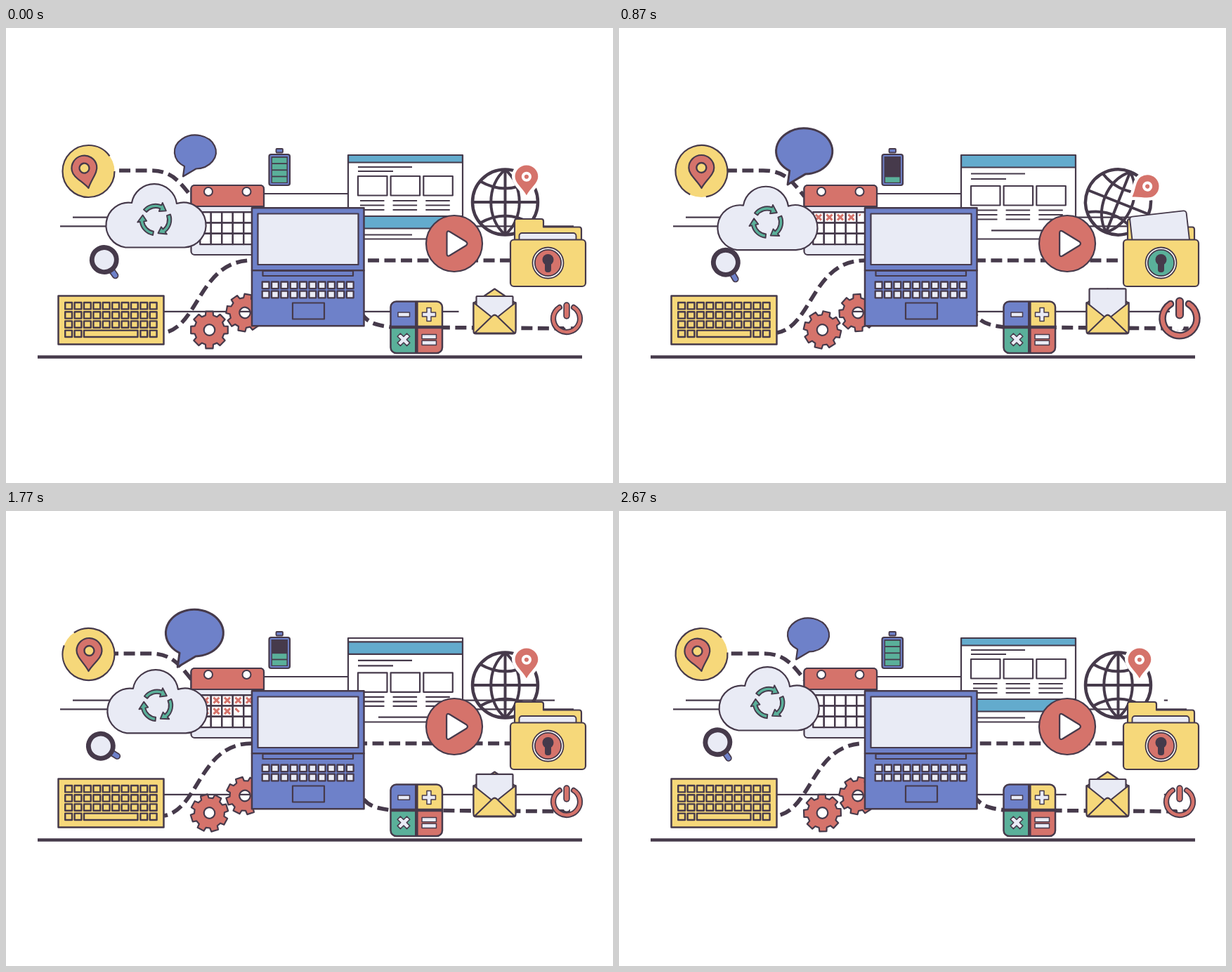
These frames come from a looping animation (864 by 648 pixels, 2.7 s). An HTML page with a canvas:

```html
<!DOCTYPE html>
<html lang="en">
<head>
<meta charset="utf-8">
<title>Connected devices</title>
<style>
html, body { margin: 0; width: 100%; height: 100%; overflow: hidden; background: #fff; }
canvas { display: block; }
</style>
</head>
<body>
<canvas id="stage" width="864" height="648"></canvas>
<script>
const ctx = document.getElementById('stage').getContext('2d');
const LOOP = 2700, TAU = Math.PI * 2, DEG = Math.PI / 180;
const dark = '#463a4b', yellow = '#f6d87a', red = '#d5736b', blue = '#6e81c9',
      green = '#5ab09a', light = '#e9ebf5', cyan = '#63abcd', white = '#fff';

// --- drawing helpers ---
function paint(path, fill, width = 2.2, stroke = dark) {
  if (fill) { ctx.fillStyle = fill; ctx.fill(path, 'evenodd'); }
  if (width) { ctx.lineWidth = width; ctx.strokeStyle = stroke; ctx.stroke(path); }
}
const shape = (d, ...style) => paint(new Path2D(d), ...style);
function box(x, y, w, h, r, ...style) {
  const p = new Path2D();
  p.roundRect(x, y, w, h, r);
  paint(p, ...style);
}
function disc(x, y, r, ...style) {
  const p = new Path2D();
  p.arc(x, y, r, 0, TAU);
  paint(p, ...style);
}
const line = (x1, y, x2, width = 2.2) => x2 > x1 && shape(`M${x1} ${y}H${x2}`, null, width);
function at(x, y, angle, scale, draw) {
  ctx.save();
  ctx.translate(x, y);
  ctx.rotate(angle * DEG);
  ctx.scale(scale, scale);
  draw();
  ctx.restore();
}
function tube(d, outer, inner, fill) {
  ctx.lineCap = 'round';
  shape(d, null, outer);
  shape(d, null, inner, fill);
  ctx.lineCap = 'butt';
}

// --- timing helpers ---
const clamp = v => Math.min(1, Math.max(0, v));
const ease = (t, a, b) => (1 - Math.cos(Math.PI * clamp((t - a) / (b - a)))) / 2;
const bump = (t, a, b) => Math.sin(Math.PI * clamp((t - a) / (b - a))) ** 2;
const TIMES = [0, 630, 1140, 1500, 2010, 2430];

// Smooth periodic curve through one value per entry of TIMES
function curve(t, values) {
  const n = TIMES.length;
  const time = i => TIMES[(i + n) % n] + LOOP * Math.floor(i / n);
  const value = i => values[(i + n) % n];
  const slope = i => (value(i + 1) - value(i - 1)) / (time(i + 1) - time(i - 1));
  let i = n - 1;
  while (TIMES[i] > t) i--;
  const d = time(i + 1) - time(i), u = (t - time(i)) / d, v = 1 - u;
  return value(i) * v * v * (1 + 2 * u) + slope(i) * d * u * v * v
       + value(i + 1) * u * u * (3 - 2 * u) - slope(i + 1) * d * u * u * v;
}

// --- scene parts ---
function wires(t) {
  line(45, 468.5, 820, 4.6);
  line(367, 236, 487);
  line(77, 282.4, 808);
  const from = t < 300 ? 644 + t / 2 : 119 + (t - 630) * 0.2537;
  const to = t > 1900 && t < 2450 ? Math.min(from + 139, 618) : from + 139;
  for (const [x1, x2, y] of [[95, 781, 269.6], [200, 784, 403.8]]) {
    line(x1, y, Math.min(from, x2));
    line(Math.max(to, x1), y, x2);
  }
  ctx.setLineDash([16, 7.5]);
  ctx.lineDashOffset = -6 - 117.5 * t / LOOP;
  shape('M155 203H205C236 203 246 218 264 240', null, 5.6);
  shape('M225 434C275 425 275 331 350 331', null, 5.6);
  shape('M509 331H718', null, 5.6);
  shape('M502 400C514 423 530 423 548 426L813 428', null, 5.6);
  ctx.setLineDash([]);
}

const PIN = 'M0 29C-6 18-18 10-18 0A18 18 0 0 1 18 0C18 10 6 18 0 29Z';

function place(t) {
  disc(117.5, 204, 37, yellow, 0);
  const gap = (342 + 360 * t / LOOP) * DEG, ring = new Path2D();
  ring.arc(117.5, 204, 37, gap + 18 * DEG, gap - 18 * DEG + TAU);
  paint(ring);
  at(117.5, 228, curve(t, [-12, -2, 0, -2, 4, -7]), 1, () => {
    ctx.translate(0, -29);
    shape(PIN, red);
    disc(0, 0, 7, yellow, 2.4);
  });
}

function calendar(t) {
  box(263.5, 224, 103.5, 99, 5, light);
  box(263.5, 224, 103.5, 30, [5, 5, 0, 0], red);
  disc(288, 233, 6, white, 2);
  disc(342.5, 233, 6, white, 2);
  for (let i = 0; i < 15; i++)
    box(276.3 + i % 5 * 15.5, 262.2 + Math.floor(i / 5) * 15.3, 15.5, 15.3, 0, white, 2.4);
  ctx.globalAlpha = 1 - ease(t, 2340, 2560);
  for (let i = 0; i < 15; i++) {
    const drawn = clamp(t * 0.0047 - i) * 2;
    const a = clamp(drawn) * 8 - 4, b = clamp(drawn - 1) * 8 - 4;
    at(284 + i % 5 * 15.5, 269.6 + Math.floor(i / 5) * 15.5, 0, 1, () => {
      if (a > -4) shape(`M-4-4L${a} ${a}`, null, 3, red);
      if (b > -4) shape(`M4-4L${-b} ${b}`, null, 3, red);
    });
  }
  ctx.globalAlpha = 1;
}

function cloud(t) {
  const w = TAU * t / LOOP;
  at(-2.3 * Math.sin(w), 2.5 - 2.5 * Math.cos(w), 0, 1, () => {
    shape('M170 312.5A32 32 0 1 1 179 249A32.4 32.4 0 0 1 243 250A32 32 0 1 1 254 312.5Z', light);
    for (let i = 0; i < 3; i++) at(213, 273, i * 120 - 140 + 360 * t / LOOP, 1, () => {
      const end = 72 * DEG, c = Math.cos(end), s = Math.sin(end), p = new Path2D();
      p.arc(0, 0, 22.3, 0, end);
      p.lineTo(26 * c, 26 * s);
      p.lineTo(19.5 * Math.cos(end + 0.48), 19.5 * Math.sin(end + 0.48));
      p.lineTo(13 * c, 13 * s);
      p.arc(0, 0, 17, end, 0, true);
      p.closePath();
      paint(p, green, 1.9);
    });
  });
}

function bubble(t) {
  const x = curve(t, [269.5, 259.5, 271, 274, 264, 267]);
  const y = curve(t, [176.5, 178, 172, 171, 176, 176]);
  at(x, y, 0, 1.25 - 0.25 * Math.cos(TAU * t / LOOP), () =>
    shape('M-15.5 20.5L-17.5 35L1 24A29.5 24 0 1 0-15.5 20.5Z', blue));
}

function battery(t) {
  box(384.5, 172, 9.5, 5.5, 1, blue, 1.8);
  box(374.5, 180, 29.5, 44, 3, blue);
  box(377.5, 183, 23.5, 38, 0, dark, 0);
  const level = [220, 450, 850].filter(s => t < s).length + 1
              + [1750, 2070, 2300].filter(s => t >= s).length;
  for (let i = 0; i < level; i++) box(379, 212.4 - i * 9.2, 20.5, 7.4, 0, green, 0);
}

function browser(t) {
  const top = 181 + 87 * (1 - ease(t, 0, 830) + ease(t, 1620, 2570));
  box(487, 181, 163, 119.5, 0, white, 0);
  ctx.save();
  ctx.beginPath();
  ctx.rect(487, 180, 163, 121);
  ctx.clip();
  ctx.translate(0, top);
  const page = (bar, first, second, frames, text) => {
    box(487, bar, 163, 17.5, 0, cyan);
    line(501, first, 578);
    line(501, second, 551);
    for (const x of [501, 547.6, 594.3]) {
      box(x, frames, 41.5, 27.5, 0, white);
      for (let i = 0; i < 3; i++) line(x + 3, text + i * 6.5, x + 37.5);
    }
  };
  page(-94, -70, -64, -57, -22);
  page(0, 26.5, 34, 44, 78.5);
  line(530, 107.3, 606);
  ctx.restore();
  box(487, 181, 163, 119.5, 0, null);
}

function globe(t) {
  const turn = 33 * bump(t, 600, 1500);
  at(710.5, 248, turn, 1, () => {
    disc(0, 0, 46.5, null, 4.5);
    shape('M0-46V46M-46 0H46M-36-30Q0-9 36-30M-36 30Q0 9 36 30', null, 4);
    shape('M0-46C-27-25-27 25 0 46C27 25 27-25 0-46', null, 4);
  });
  const angle = (turn - 50) * DEG;
  at(710.5 + 47.3 * Math.cos(angle), 248 + 47.3 * Math.sin(angle), turn * 2.55, 0.91, () => {
    shape(PIN, red, 10, white);
    shape(PIN, red, 0);
    disc(0, 0, 5.6, red, 4.4, white);
  });
}

function folder(t) {
  shape('M724 310V275Q724 272 727 272H762Q765 272 765 275V283.5H816Q819 283.5 819 287V310Z', yellow);
  const lift = ease(t, 250, 720) - ease(t, 1250, 1700);
  at(771 - 4 * lift, 292 - 27.5 * lift, -6.5 * lift, 1, () => box(-40.5, 0, 81, 45, 4, light, 1.9));
  box(718, 301.5, 107, 66.5, 5, yellow);
  disc(771.5, 334.5, 22, white, 1.8);
  disc(771.5, 334.5, 18.7, t > 200 && t < 1750 ? green : red, 1.8);
  disc(771.5, 330, 8, dark, 0);
  box(767, 331, 9, 17, 4, dark, 0);
}

function player(t) {
  disc(638, 307, 40, red);
  const phase = t % 900 / 900;
  at(640.5, 307, 0, 1 + 0.33 * bump(phase, 0.3, 1.04), () =>
    shape('M-13-14.5Q-13-19-9-17L14-3Q18 0 14 3L-9 17Q-13 19-13 14.5Z', white));
}

function laptop() {
  box(350, 256.3, 159.5, 89, 0, blue, 2.5);
  box(358.5, 264.5, 143, 72.5, 0, light);
  box(350, 345.3, 159.5, 79, 0, blue, 2.5);
  box(365.5, 346, 128.5, 7, 0, blue);
  for (let i = 0; i < 20; i++)
    box(364.7 + i % 10 * 13.35, i < 10 ? 361.5 : 374.7, 9.8, 9.6, 0, light, 2.3);
  box(408, 391.5, 45, 23, 0, blue);
}

function keyboard(t) {
  box(74.5, 381.5, 150, 69, 0, yellow, 2.5);
  const presses = [[560, 700, 25], [1050, 1200, 32], [1430, 1570, 14], [2360, 2500, 25]];
  const hit = presses.find(([a, b]) => t >= a && t < b);
  for (let i = 0; i < 40; i++) {
    const col = i % 10, row = Math.floor(i / 10);
    if (row === 3 && col > 2 && col < 8) continue;
    box(84.2 + col * 13.4, 391 + row * 13.2, i === 32 ? 76.5 : 9.8, 9.4, 0,
        hit && hit[2] === i ? red : yellow, 2.4);
  }
}

function gear(x, y, angle) {
  const p = new Path2D();
  for (let i = 0; i < 8; i++)
    for (const [r, a] of [[21.5, -0.26], [26.8, -0.19], [26.8, 0.19], [21.5, 0.26]])
      p.lineTo(r * Math.cos(a + i * TAU / 8), r * Math.sin(a + i * TAU / 8));
  p.closePath();
  p.moveTo(7.8, 0);
  p.arc(0, 0, 7.8, 0, TAU);
  at(x, y, angle, 1, () => paint(p, red));
}

function magnifier(t) {
  const x = curve(t, [139.8, 147, 154, 135, 139, 153]);
  const y = curve(t, [330, 335, 333, 342, 326.5, 319]);
  at(x, y, curve(t, [55, 57, 58, 29, 40, 63]), 1, () => {
    tube('M20 0H27.5', 9.6, 6.2, blue);
    disc(0, 0, 17.5, light, 6.8);
  });
}

function calculator() {
  const tiles = [[547.5, 389.5, blue], [584.5, 389.5, yellow], [547.5, 426, green], [584.5, 426, red]];
  ctx.save();
  ctx.beginPath();
  ctx.roundRect(547.5, 389.5, 73.5, 73.5, 8);
  ctx.clip();
  for (const [x, y, color] of tiles) box(x, y, 37, 37, 0, color, 0);
  ctx.restore();
  shape('M584.3 390V463M548 426H621', null, 4.6);
  box(547.5, 389.5, 73.5, 73.5, 8, null, 2.5);
  const plus = 'M-3-9.5H3V-3H9.5V3H3V9.5H-3V3H-9.5V-3H-3Z';
  box(558, 405, 16.5, 6.2, 0, light, 1.5);
  at(602, 408, 0, 1, () => shape(plus, light, 1.5));
  at(566, 443.8, 45, 1, () => shape(plus, light, 1.5));
  box(592, 436.5, 20.5, 6.2, 0, light, 1.5);
  box(592, 445.3, 20.5, 6.2, 0, light, 1.5);
}

function envelope(t) {
  const lift = clamp((t - 300) / 830) - ease(t, 1560, 1960);
  shape('M665.5 392L695.5 371.5L725.5 392V430H665.5Z', yellow);
  box(669.5, 382 - 15.5 * lift, 52, 45, 1, light);
  shape('M665.5 391L695.5 415L725.5 391V432Q725.5 435.5 722 435.5H669Q665.5 435.5 665.5 432Z', yellow);
  shape('M667 434.5L692 410.5Q695.5 407 699 410.5L724 434.5Z', yellow);
}

function power(t) {
  at(798, 415, 0, 1 + 0.66 * bump(t, 690, 1480), () => {
    const p = new Path2D();
    p.arc(0, -1, 19, -58 * DEG, 238 * DEG);
    tube(p, 8.2, 4.6, red);
    ctx.lineCap = 'round';
    shape('M0-20V8', null, 9, white);
    tube('M0-20V-5', 9.4, 6, red);
  });
}

function frame(now) {
  const t = now % LOOP, spin = 180 * t / LOOP;
  ctx.fillStyle = white;
  ctx.fillRect(0, 0, 864, 648);
  ctx.lineJoin = 'round';
  wires(t);
  place(t);
  calendar(t);
  cloud(t);
  bubble(t);
  battery(t);
  browser(t);
  globe(t);
  folder(t);
  player(t);
  gear(340, 405.5, 10 - spin);
  gear(289.5, 430, spin);
  laptop();
  keyboard(t);
  magnifier(t);
  calculator();
  envelope(t);
  power(t);
  requestAnimationFrame(frame);
}
requestAnimationFrame(frame);
</script>
</body>
</html>
```
